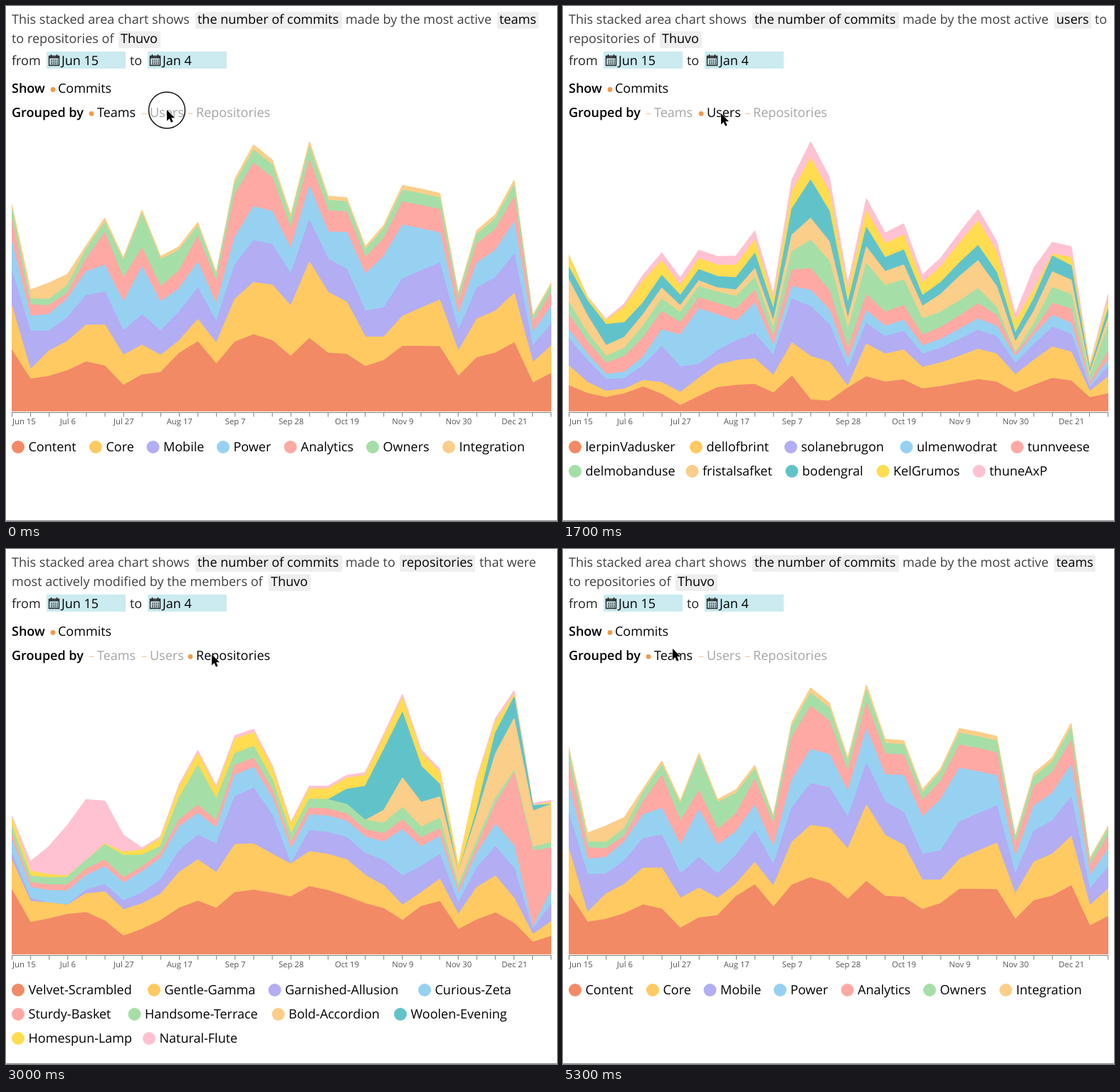
An HTML page for the animation above (5600 ms loop, 774 by 724 pixels).

```html
<!DOCTYPE html>
<html lang="en">
<head>
<meta charset="utf-8">
<title>Stacked area chart</title>
<style>
html, body { margin: 0; width: 100%; height: 100%; overflow: hidden; background: #fff; }
svg { display: block; font: 18px "Open Sans", "Noto Sans", sans-serif; text-rendering: geometricPrecision; }
</style>
</head>
<body>
<svg id="stage" width="774" height="724" viewBox="0 0 774 724">
  <defs><clipPath id="plot"><rect x="8" y="180" width="758" height="389.8"/></clipPath></defs>
</svg>
<script>
const LOOP = 5600, BASE = 570, LEFT = 8, WEEKS = 30, STEP = 758 / (WEEKS - 1);
const COLORS = ['#f28a66', '#ffca62', '#b3adf3', '#97d1f2', '#ffa9a5',
  '#a5dfa7', '#fbce8a', '#61c3ca', '#ffdc50', '#ffc2d2'];
const stage = document.getElementById('stage');

function el(tag, attrs, parent = stage, text) {
  const node = document.createElementNS('http://www.w3.org/2000/svg', tag);
  for (const key in attrs) node.setAttribute(key, attrs[key]);
  if (text) node.textContent = text;
  parent.appendChild(node);
  return node;
}
const word = (x, y, text, parent, fill = '#404040', more) =>
  el('text', { x, y, fill, ...more }, parent, text);
function tag(x, y, w, text, parent) {
  el('rect', { x: x - 3, y: y - 16.5, width: w, height: 23.5, rx: 2, fill: '#eee' }, parent);
  word(x, y, text, parent, '#000');
}
const clamp = v => Math.max(0, Math.min(1, v));
const mix = (a, b, k) => a + (b - a) * k;
const ease = k => k < .5 ? 4 * k ** 3 : 1 - 4 * (1 - k) ** 3;

// A layer's share of the week: a base plus tent-shaped swells [week, reach, gain].
const layer = (base, ...swells) => week => Math.max(0, swells.reduce(
  (sum, [at, reach, gain]) => sum + gain * Math.max(0, 1 - Math.abs(week - at) / reach), base));

// Splits the weekly totals between layers; returns the upper edge of each one.
function stack(totals, ...layers) {
  const edges = layers.map(() => []);
  totals.forEach((total, week) => {
    const shares = layers.map(share => share(week));
    const unit = total / shares.reduce((a, b) => a + b);
    let y = BASE;
    shares.forEach((share, i) => edges[i].push(y -= share * unit));
  });
  return edges;
}

const teams = stack(
  [291, 171, 181, 193, 233, 272, 216, 283, 218, 232, 266, 195, 327, 375, 354,
    276, 379, 303, 301, 232, 262, 318, 313, 307, 166, 255, 277, 325, 135, 181],
  layer(28, [6.3, 2.5, -12], [10.5, 3, 9]),
  layer(20, [1, 1, -12], [9, 3, -13], [16.5, 3, 11], [20.5, 2.5, -9]),
  layer(16, [1, 1, 17]),
  layer(13, [7, 2, 12], [20, 3, 15]),
  layer(10, [3, 2, -6], [5.5, 1.5, 9], [12, 3, 10]),
  layer(5, [7.5, 2.5, 16]),
  layer(2, [2, 2, 11]));

const users = stack(
  [220, 162, 130, 152, 192, 223, 188, 227, 218, 219, 254, 165, 326, 379, 330,
    179, 299, 251, 264, 192, 216, 251, 284, 239, 136, 202, 238, 232, 65, 165],
  layer(17, [6, 2, -12], [13.5, 1.5, -19], [28, 1, 20]),
  layer(16, [3.5, 4.5, -13], [15, 1, -15]),
  layer(10, [.7, 2, 12], [5.4, 1.4, 18], [12, 4, 11]),
  layer(6, [7, 2.3, 34], [10, 1.2, 13]),
  layer(8, [3, 4, 7], [24.5, 2, -7]),
  layer(8, [16.5, 5, 8], [24, 2, -7], [29, 2, 16]),
  layer(8, [.7, 3, 9], [8, 4, -5], [21.5, 3, 8]),
  layer(8, [2, 1.5, 17], [13, 4, 6]),
  layer(8, [1.5, 1.3, -8], [3.5, 1.7, 10], [22, 4, 5], [26, 2, -7]),
  layer(6, [0, 6, -6], [25, 1, 8]));

const repos = stack(
  [195, 131, 152, 182, 218, 216, 168, 150, 166, 239, 287, 237, 308, 317, 266,
    186, 237, 237, 252, 256, 310, 366, 288, 261, 125, 248, 332, 371, 213, 217],
  layer(26, [0, 1, 18], [6, 2, -12], [16, 3.5, 13], [21, 1.5, -12], [28, 4, -18]),
  layer(20, [3, 2.5, -14], [21.5, 3.5, -16], [28, 3, -15]),
  layer(12, [2.5, 6, -13], [13, 3, 12], [15, 1, -20], [28, 1, -9]),
  layer(9, [7.5, 3, 9], [21, 1, 10], [28, 1, -8]),
  layer(4, [28, 2.2, 46]),
  layer(5, [6, 1.5, 12], [10, 2, 14], [27, 3, -4]),
  layer(0, [29, 10, 26], [21, 2, 7]),
  layer(0, [20.4, 3.2, 33], [26.5, 2.2, 11]),
  layer(6, [4, 4, -7], [25, 1, 12], [28, 2.5, -8]),
  layer(1.5, [3.7, 3.2, 40]));

const sets = [teams, users, repos];
// Missing layers lie flat on the topmost one.
const edgeOf = (set, i) => set[Math.min(i, set.length - 1)];

// Chart: upper layers first, each filled down to the axis.
const plot = el('g', { 'clip-path': 'url(#plot)', 'stroke-width': 1.6, 'stroke-linejoin': 'round' });
const areas = [];
for (let i = COLORS.length - 1; i >= 0; i--) areas[i] = el('path', { fill: COLORS[i], stroke: COLORS[i] }, plot);

function drawAreas(from, to, k) {
  let below = null;
  areas.forEach((path, i) => {
    const a = edgeOf(from, i), b = edgeOf(to, i);
    const ys = a.map((y, n) => mix(y, b[n], k) + .5);
    const flat = below && ys.every((y, n) => below[n] - y < .3);
    path.style.display = flat ? 'none' : '';
    if (!flat) {
      const line = ys.map((y, n) => (LEFT + n * STEP).toFixed(2) + ' ' + y.toFixed(2)).join('L');
      path.setAttribute('d', `M0 ${BASE + 4}L0 ${ys[0]}L${line}L774 ${ys[WEEKS - 1]}V${BASE + 4}Z`);
    }
    below = ys;
  });
}

// Axis
let ticks = 'M8 571.5H766';
for (let n = 0; n < WEEKS; n++) ticks += `M${(LEFT + .5 + n * STEP * .999).toFixed(1)} 571.5v6`;
el('path', { d: ticks, stroke: '#808080', fill: 'none' });
['Jun 15', 'Jul 6', 'Jul 27', 'Aug 17', 'Sep 7', 'Sep 28', 'Oct 19', 'Nov 9', 'Nov 30', 'Dec 21']
  .forEach((label, i) => word(i ? LEFT + i * 3 * STEP + .5 : 9, 587.5, label, stage, '#555',
    { 'font-size': 11.3, 'text-anchor': i ? 'middle' : 'start' }));
el('rect', { y: 723, width: 774, height: 1, fill: '#888' });

// Fixed header parts
word(8, 25, 'This stacked area chart shows');
tag(269, 25, 206, 'the number of commits');
word(8, 83, 'from', stage, '#222');
word(174, 83, 'to', stage, '#222');
function dateBox(x, text) {
  el('rect', { x, y: 64, width: 111, height: 24, rx: 1, fill: '#cbebf0' });
  el('path', { d: `M${x + 3.5} 70.5h14v13h-14ZM${x + 6.5} 68v4m8 -4v4`, fill: 'none', stroke: '#222', 'stroke-width': 1.4 });
  el('path', { d: `M${x + 3.5} 72.5h14`, stroke: '#222', 'stroke-width': 2 });
  el('path', { d: `M${x + 6} 76.2h10m-10 2.5h10m-10 2.5h10`, stroke: '#222', 'stroke-width': 1.5, 'stroke-dasharray': '1.6 1.1' });
  word(x + 21, 83, text, stage, '#000');
}
dateBox(57, 'Jun 15');
dateBox(199, 'Jan 4');
word(8, 122, 'Show', stage, '#000', { 'font-weight': 600 });
el('circle', { cx: 66, cy: 117.5, r: 3.4, fill: '#f39a4b' });
word(73, 122, 'Commits', stage, '#000');
word(8, 156, 'Grouped by', stage, '#000', { 'font-weight': 600 });

// Grouping choices
const choices = [['Teams', 128], ['Users', 202], ['Repositories', 267]].map(([name, x]) => ({
  x: x - 8,
  mark: el('rect', { fill: '#f39a4b' }),
  label: word(x, 156, name)
}));
function drawChoice({ x, mark, label }, k) {
  const w = mix(7, 6.8, k), h = mix(1.3, 6.8, k), grey = Math.round(mix(165, 0, k));
  const box = { x: x - w / 2, y: 151.3 - h / 2, width: w, height: h, rx: h / 2, opacity: mix(.55, 1, k) };
  for (const key in box) mark.setAttribute(key, box[key]);
  label.setAttribute('fill', `rgb(${grey},${grey},${grey})`);
}

// Sentences and legends, one group per view
const views = sets.map(() => el('g', {}));
const owner = 'Thuvo';
word(477, 25, 'made by the most active', views[0]);
tag(693, 25, 58, 'teams', views[0]);
word(8, 52, 'to repositories of', views[0]);
tag(161, 52, 59, owner, views[0]);

word(477, 25, 'made by the most active', views[1]);
tag(693, 25, 52, 'users', views[1]);
word(747, 25, 'to', views[1]);
word(8, 52, 'repositories of', views[1]);
tag(139, 52, 59, owner, views[1]);

word(477, 25, 'made to', views[2]);
tag(556, 25, 106, 'repositories', views[2]);
word(665, 25, 'that were', views[2]);
word(8, 52, 'most actively modified by the members of', views[2]);
tag(372, 52, 59, owner, views[2]);

function legend(view, ...rows) {
  let i = 0;
  rows.forEach((row, r) => {
    for (const [x, name] of row) {
      el('circle', { cx: x, cy: 620 + r * 34, r: 9, fill: COLORS[i++] }, view);
      word(x + 14.5, 626 + r * 34, name, view, '#000');
    }
  });
}
legend(views[0],
  [[17, 'Content'], [126, 'Core'], [206.5, 'Mobile'], [305, 'Power'], [399.5, 'Analytics'], [515, 'Owners'], [622, 'Integration']]);
legend(views[1],
  [[17, 'lerpinVadusker'], [187, 'dellofbrint'], [320, 'solanebrugon'], [482.5, 'ulmenwodrat'], [638, 'tunnveese']],
  [[17, 'delmobanduse'], [181.5, 'fristalsafket'], [321.5, 'bodengral'], [449.5, 'KelGrumos'], [584.5, 'thuneAxP']]);
legend(views[2],
  [[17, 'Velvet-Scrambled'], [208, 'Gentle-Gamma'], [377.5, 'Garnished-Allusion'], [588, 'Curious-Zeta']],
  [[17, 'Sturdy-Basket'], [180.5, 'Handsome-Terrace'], [382.5, 'Bold-Accordion'], [554, 'Woolen-Evening']],
  [[17, 'Homespun-Lamp'], [201, 'Natural-Flute']]);

// Pointer
const ring = el('circle', { cx: 226, cy: 146.5, r: 25.5, fill: 'none', stroke: '#111', 'stroke-width': 1.5 });
const pointer = el('g', { 'stroke-linejoin': 'round' });
const arrow = el('path', {
  d: 'M0 0V15.5L3.6 12.2 6 17.7 8.6 16.6 6.2 11.2H11Z', fill: '#000', stroke: '#fff', 'stroke-width': 1, 'paint-order': 'stroke'
}, pointer);
const hand = el('path', {
  d: 'M-2 13V4Q-2 2 -.5 2T1 4V8Q1 6.8 2.5 6.8T4 8.4Q4.2 7.4 5.5 7.4T7 9Q7.2 8.2 8.4 8.4T9.6 10V13Q9.6 15.5 8.2 17V19.5H-.5V18Q-2.5 16 -5 12Q-5.8 10.4 -4.6 9.8T-2 11.5M2.2 12.5v4M4.6 12.5v4M7 12.5v4',
  fill: '#fff', stroke: '#111', 'stroke-width': 1.2
}, pointer);

function drawPointer(t) {
  let x, y;
  if (t < 2200) {
    const k = clamp((t - 550) / 250);
    x = mix(226, 222, k);
    y = mix(146, 151, k);
  } else {
    const k = ease(clamp((t - 3720) / 580));
    x = mix(289, 154, k);
    y = mix(148, 140, k);
  }
  const link = (t >= 600 && t < 1000) || (t >= 2200 && t < 2700) || (t >= 3800 && t < 4470);
  pointer.setAttribute('transform', `translate(${x} ${y})`);
  arrow.style.display = link ? 'none' : '';
  hand.style.display = link ? '' : 'none';
  ring.style.display = t < 100 ? '' : 'none';
}

// Each switch: sentence time, start of the morph, old and new view
const MORPH = 250, MARK = 40;
const switches = [[1000, 1400, 0, 1], [2650, 2700, 1, 2], [4470, 4479, 2, 0]];

function render(t) {
  let shown = 0, from = 0, to = 0, start = -LOOP;
  for (const [textAt, morphAt, a, b] of switches) {
    if (t >= textAt) shown = b;
    if (t >= morphAt) [from, to, start] = [a, b, morphAt];
  }
  views.forEach((view, i) => view.style.display = i === shown ? '' : 'none');
  drawAreas(sets[from], sets[to], ease(clamp((t - start) / MORPH)));
  const k = clamp((t - start - MORPH) / MARK);
  choices.forEach((choice, i) => drawChoice(choice, i === to ? (from === to ? 1 : k) : i === from ? 1 - k : 0));
  drawPointer(t);
}

const begin = performance.now();
function tick() {
  render((performance.now() - begin) % LOOP);
  requestAnimationFrame(tick);
}
tick();
</script>
</body>
</html>
```
